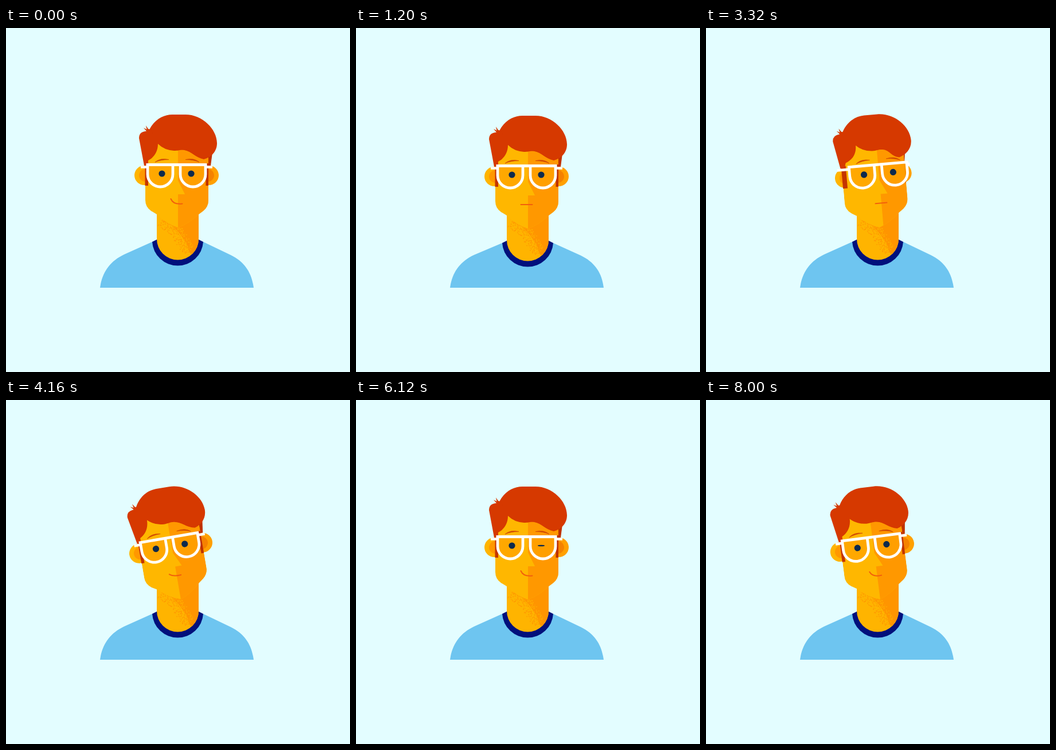
Recreate the animation shown at these times as an HTML page. Size 600x600 px, loop 8040 ms.

```html
<!DOCTYPE html>
<html lang="en">
<head>
<meta charset="utf-8">
<title>Man with glasses</title>
<style>
  html, body { margin: 0; width: 100%; height: 100%; overflow: hidden; background: #e3fdff; }
  svg { display: block; width: 100vw; height: 100vh; }
</style>
</head>
<body>
<svg viewBox="0 0 600 600">
  <defs>
    <clipPath id="neckClip"><path d="M263 296H336V368A36.5 36.5 0 0 1 263 368Z"/></clipPath>
    <clipPath id="faceClip"><path d="M243 196H353V300Q353 312 344 319L336 325Q320 341 300 348Q278 341 263 325L253 319Q243 312 243 300Z"/></clipPath>
    <path id="lens" d="M-22 239V255A22 22 0 0 0 22 255V239"/>
    <path id="brow" d="M-12 3Q-3 -5 12 -1.5Q-2 -1.500 -12 3Z" fill="#d04a05" stroke="#d04a05" stroke-width=".7"/>
    <path id="arc" d="M-5.500 0C-5 -9 5 -9 5.500 0"/>
  </defs>
  <path id="shirt" fill="#6ec5f0"/>
  <g id="neck">
    <path d="M255 373A44.6 44.6 0 0 0 344 373L336 369H263Z" fill="#00107c"/>
    <g clip-path="url(#neckClip)">
      <rect x="260" y="290" width="80" height="120" fill="#ffb400"/>
      <path d="M274 336Q306 350 321 393L340 400V296H300V336Z" fill="#ff9500"/>
      <g id="dots"/>
    </g>
  </g>
  <g id="head">
    <g id="earL">
      <circle cx="241" cy="257" r="17" fill="#ffb400"/>
      <circle cx="243" cy="257" r="11" fill="#ff9800"/>
    </g>
    <g id="earR">
      <circle cx="354" cy="257" r="17" fill="#ffa000"/>
      <circle cx="352" cy="257" r="11" fill="#f58200"/>
    </g>
    <path id="backHair" d="M330 182H353Q364 183 363 195L357 240H349L342 222Z" fill="#bf3200"/>
    <g clip-path="url(#faceClip)">
      <rect x="240" y="190" width="116" height="162" fill="#ffb700"/>
      <path id="shade" fill="#ff9800"/>
    </g>
    <rect id="burnL" x="242.5" y="236" height="39" fill="#c43400"/>
    <rect id="burnR" y="236" height="39" fill="#bf3200"/>
    <path id="hair" fill="#d63900"/>
    <path id="tuft" d="M239 184L245 180L240 174L245.5 177L244 170L248 176L252 177L256 184Z" fill="#d63900"/>
    <g id="face">
      <use id="browL" href="#brow"/>
      <use id="browR" href="#brow"/>
      <g fill="#ffa200" opacity=".7">
        <use href="#lens" x="269"/><use href="#lens" x="326"/>
      </g>
      <g id="eyes" fill="#0c2a4d">
        <circle cx="272" cy="254" r="5.6"/>
        <ellipse id="eyeR" cx="323" cy="254"/>
      </g>
      <g id="glee" fill="none" stroke="#0c2a4d" stroke-width="2.6" stroke-linecap="round">
        <use href="#arc" x="272" y="260"/><use href="#arc" x="323" y="260"/>
      </g>
      <path id="lips" fill="none" stroke="#f2600c" stroke-width="2" stroke-linecap="round"/>
      <path id="laugh" d="M-11.500 0H11.500V4A11.500 11.500 0 0 1 -11.500 4Z" fill="#ff5a0a"/>
      <g fill="none" stroke="#fff" stroke-width="4.8">
        <use href="#lens" x="269"/><use href="#lens" x="326"/>
        <path d="M244.500 238.500H350.500"/>
      </g>
    </g>
    <path id="temples" fill="none" stroke="#fff" stroke-width="4.6"/>
  </g>
</svg>
<script>
const LOOP = 8040, STEP = 40;
const $ = id => document.getElementById(id);
const set = (id, attrs) => { for (const k in attrs) $(id).setAttribute(k, attrs[k]); };
const move = (id, x, y = 0) => set(id, { transform: `translate(${x} ${y})` });
const show = (id, on) => set(id, { visibility: on ? 'visible' : 'hidden' });

// Timing shapes: an eased step, a plateau, a single bump and a steady sway
const ramp = (t, from, to) => {
  const u = Math.min(1, Math.max(0, (t - from) / (to - from)));
  return u * u * (3 - 2 * u);
};
const hold = (t, from, to, ease = 300) => ramp(t, from, from + ease) - ramp(t, to, to + ease);
const bump = (t, mid, half) => ramp(t, mid - half, mid) - ramp(t, mid, mid + half);
const sway = (t, period, low) => -Math.cos((t - low) / period * 2 * Math.PI);

function pose(t) {
  const hops = bump(t, 400, 300) + bump(t, 5400, 300);
  const chuckle = hold(t, 4340, 5100, 200);
  const turn = -hold(t, 1500, 2430) + hold(t, 2430, 3480) - hold(t, 3480, 3900);
  return {
    turn,
    lift: 19 * hops + hold(t, 800, 3120, 200) * (3 + 5 * sway(t, 1000, 1200))
      + chuckle * (6 + 3 * sway(t, 320, 4730)) + 6 * bump(t, 6480, 280),
    shrug: 1.2 * hops + chuckle,
    tilt: -5 * turn - 6 * bump(t, 4230, 300) - 5 * hold(t, 3900, 5200) - 7.3 * ramp(t, 6840, 7320),
    smile: 1 - hold(t, 300, 4000),
    joy: hold(t, 4340, 5560, 120),
    wink: hold(t, 6020, 6280, 90)
  };
}

function stipple() {
  let seed = 7;
  const rnd = () => (seed = seed * 16807 % 2147483647) / 2147483647;
  const dot = (u, v, fill) => {
    const x = 273 + 48 * u - v * .6, y = 335 + 18 * u + 38 * u * u + v * .75;
    return `<circle cx="${x}" cy="${y}" r="${.6 + rnd() * .4}" fill="${fill}"/>`;
  };
  let dots = '';
  for (let i = 0; i < 160; i++) {
    dots += dot(rnd(), rnd() ** 1.5 * 15, '#ff9800') + dot(rnd(), -(rnd() ** 1.5) * 12, '#ffae00');
  }
  $('dots').innerHTML = dots;
}

function drawShirt(lift, s) {
  const low = lift * .4, top = 373 - lift - 3 * s, bend = 395 - low - 21 * s;
  set('shirt', { d: `M${164 + 4 * s} 453L${165 + 5 * s} ${447 - 12 * s}
    C${170 + 2 * s} ${423 - 16 * s} ${183 + 11 * s} ${406 - low - 28 * s} ${206 + 8 * s} ${bend}
    L${255 + 3 * s} ${top}H${344 - 3 * s}L${392 - 4 * s} ${bend + 1 - 2 * s}
    C${415 - 6 * s} ${407 - low - 28 * s} ${427 + s} ${425 - 18 * s} ${431 - 2 * s} ${447 - 10 * s}
    L${432 + s} 453Z` });
}

function drawHair(turn, drop) {
  const away = Math.min(turn, 0), a = 9 * away, d = 16 * away, h = 6 * turn, edge = 232 + 2 * away;
  set('hair', { d: `M${edge} 192Q${edge} 181 244 180H262L${265 + h} 202
    C${265 + h} 216 ${258 + h} 226 ${248 + h / 2} 231L248 240H241Z
    M${248 + a} 182C${256 + a} 161 ${274 + a} 151 ${290 + a} 151H${313 + d / 2}
    C${342 + d} 151 ${368 + d} 176 ${368 + d} 201C${368 + d} 216 ${357 + d / 2} 226 ${345 + d / 5} ${229 + drop}
    C${330 + d / 5} ${226 + drop} ${324 + h} ${215 + drop} ${311 + h} ${213 + drop}
    C${303 + h} ${212 + drop} ${301 + h} ${214 + drop} ${293 + h} ${214 + drop}
    Q${276 + h} ${213 + drop} ${265 + h} 202Z` });
  show('tuft', turn > -.4);
}

function drawMouth(smile, turn, joy) {
  const slant = 3 * Math.max(0, -turn);
  set('lips', { d: `M${287.5 + slant * .4} ${306 - 8 * smile + slant}
    Q${297 - 5 * smile} ${306 + 2.5 * smile} 307.5 ${306 + .5 * smile - slant}` });
  show('lips', joy < .1);
  show('laugh', joy >= .1);
  set('laugh', { transform: `translate(297.5 297) scale(1 ${joy})` });
}

function drawGlassesArms(turn, shift, joy, drop) {
  const y = 242.5 + drop, tip = y - 10 * joy, left = 247 + shift, right = 348 + shift;
  const endL = Math.min(left - 2, 235 - 5 * Math.min(turn, 0) + 4 * joy);
  const endR = Math.max(right + 2, 360 + 2 * Math.abs(turn) - 4 * joy);
  set('temples', { d: `M${endL} ${tip}L${left} ${y}M${right} ${y}L${endR} ${tip}` });
}

function render(t) {
  const { lift, shrug, tilt, turn, smile, joy, wink } = pose(t);
  const side = Math.abs(turn), away = Math.min(turn, 0);
  const shift = 8 * turn + side, drop = 3 * joy;

  drawShirt(lift, shrug);
  move('neck', 0, -lift);
  set('head', { transform: `translate(0 ${-lift}) rotate(${tilt} 300 317)` });
  move('earL', 6 * side, -5 * joy);
  move('earR', -4.5 * side - 2.5 * turn, -5 * joy);
  move('backHair', -4 * Math.max(turn, 0) + 4 * joy, -5 * joy);
  set('shade', { d: `M300 180V266L${312 + 8 * away} 290H300V352H380V180Z` });
  move('shade', 7 * turn, drop);
  move('face', shift, drop);
  drawHair(turn, drop);

  const burn = 4.5 - 4 * turn;
  set('burnL', { width: 5.5 + 2.5 * turn });
  set('burnR', { x: 353 - burn, width: burn });
  set('browL', { transform: `translate(272 231) rotate(${-10 * joy})` });
  set('browR', { transform: `translate(325 231) scale(-1 1) rotate(${-8 * joy})` });
  show('eyes', joy < .5);
  show('glee', joy >= .5);
  set('eyeR', { rx: 5.6 + .6 * wink, ry: 5.6 - 4.3 * wink });
  drawMouth(smile, turn, joy);
  drawGlassesArms(turn, shift, joy, drop);
}

stipple();
const start = performance.now();
function tick() {
  const t = Math.max(0, performance.now() - start) % LOOP;
  render(Math.floor(t / STEP) * STEP);
  requestAnimationFrame(tick);
}
tick();
</script>
</body>
</html>
```
